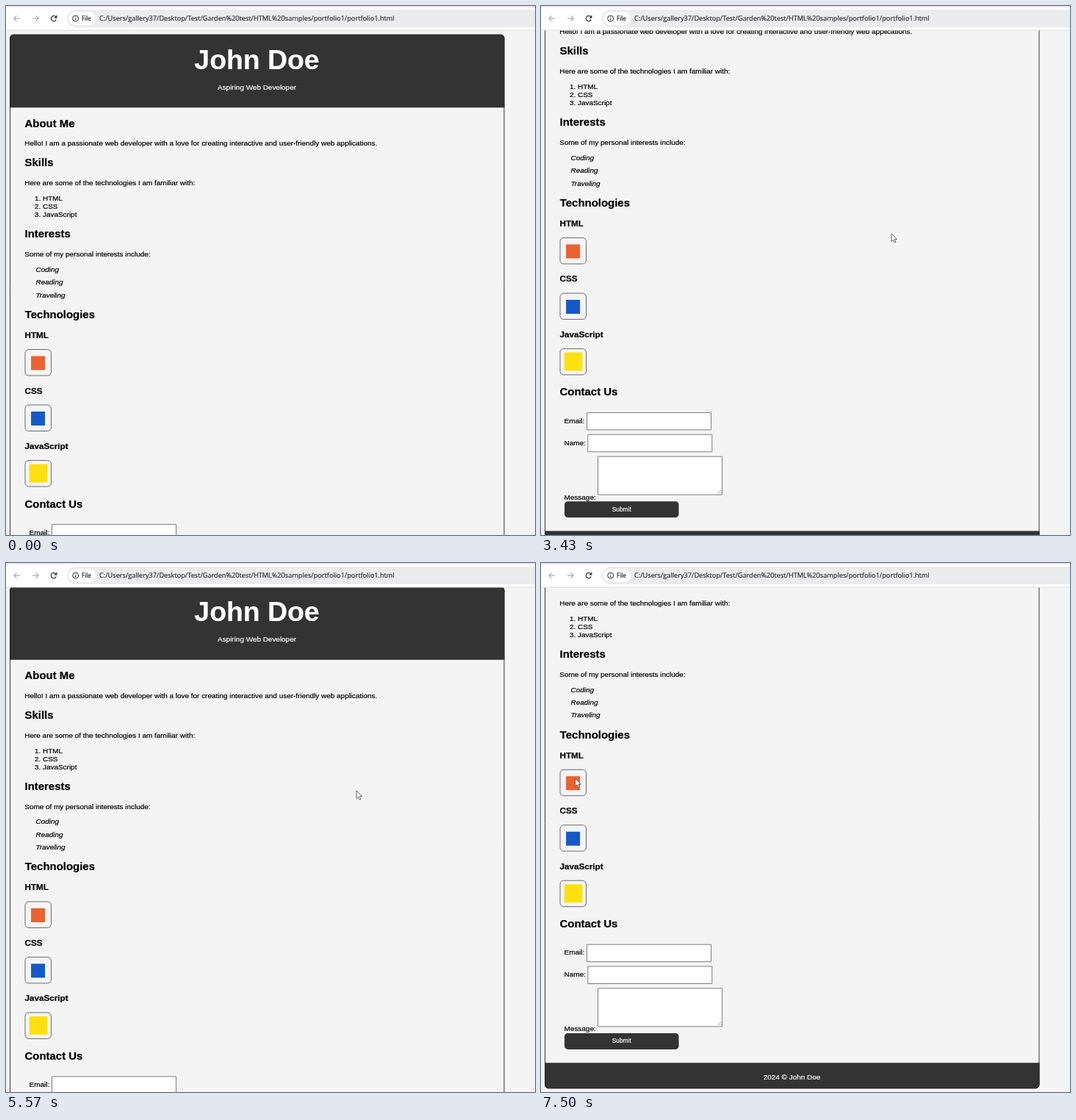
Write an HTML page with a canvas that moves like this. It is 720 by 720 pixels and loops after 7.53 s.

```html
<!DOCTYPE html>
<html lang="en">
<head>
<meta charset="utf-8">
<title>Portfolio page</title>
<style>
  html, body { margin: 0; width: 100%; height: 100%; overflow: hidden; background: #f4f4f4; }
  canvas { display: block; width: 720px; height: 720px; }
</style>
</head>
<body>
<canvas id="stage" width="720" height="720"></canvas>
<script>
const ctx = document.getElementById('stage').getContext('2d');
const LOOP = 7530;
const FPS = 30;
const BOTTOM = 186.3;
const MID = 341.5;
const DARK = '#333';
const SANS = '"Liberation Sans", Arial, sans-serif';
const UI = '"Open Sans", "Noto Sans", sans-serif';
const BODY = '9.95px ' + SANS;
const ITALIC = 'italic ' + BODY;
const H2 = 'bold 14.95px ' + SANS;
const H3 = 'bold 11.7px ' + SANS;

// Time, x and y of the pointer tip
const POINTER = [
  [320, 697, 207], [700, 398, 371], [1070, 461, 329], [1400, 476.5, 309.5],
  [6480, 476.5, 309.5], [6720, 451, 346], [7067, 451, 346], [7500, 46.2, 293]
];

// A hairline outline gives small type its screen weight
function text(str, x, y, font, color = '#000', align = 'left') {
  ctx.font = font;
  ctx.fillStyle = ctx.strokeStyle = color;
  ctx.textAlign = align;
  ctx.lineWidth = 0.2;
  ctx.fillText(str, x, y);
  ctx.strokeText(str, x, y);
}

function fillBox(x, y, w, h, color, radius = 0) {
  ctx.beginPath();
  ctx.roundRect(x, y, w, h, radius);
  ctx.fillStyle = color;
  ctx.fill();
}

function strokeBox(x, y, w, h, color, radius = 0, width = 1) {
  ctx.beginPath();
  ctx.roundRect(x, y, w, h, radius);
  ctx.strokeStyle = color;
  ctx.lineWidth = width;
  ctx.stroke();
}

function line(points, color, width = 1) {
  ctx.beginPath();
  points.forEach(([x, y]) => ctx.lineTo(x, y));
  ctx.strokeStyle = color;
  ctx.lineWidth = width;
  ctx.stroke();
}

// Wheel scrolling: quick start, long settle
function glide(t, start, tau, power) {
  return t <= start ? 0 : 1 - Math.exp(-Math.pow((t - start) / tau, power));
}

function scrollAt(t) {
  if (t < 5237) return BOTTOM * glide(t, 3167, 207, 2.09);
  if (t < 6240) return BOTTOM * (1 - glide(t, 5237, 166, 1.76));
  return BOTTOM * glide(t, 6240, 203, 1.76);
}

function pointerAt(t) {
  if (t < POINTER[0][0]) return null;
  const i = POINTER.findIndex(p => p[0] > t);
  if (i < 0) return POINTER[POINTER.length - 1].slice(1);
  const [t0, x0, y0] = POINTER[i - 1];
  const [t1, x1, y1] = POINTER[i];
  const u = (t - t0) / (t1 - t0);
  const e = u * u * (3 - 2 * u);
  return [x0 + (x1 - x0) * e, y0 + (y1 - y0) * e];
}

function drawTech(name, y, color, size, cx, cy) {
  text(name, 25.5, y, H3);
  strokeBox(26, y + 15.5, 35.5, 35.5, '#6a6a6a', 5);
  fillBox(cx - size / 2, y + cy - size / 2, size, size, color);
}

function drawForm() {
  const edge = '#7d7d7d';
  text('Email:', 31.6, 719.6, BODY);
  text('Name:', 31.6, 749.6, BODY);
  text('Message:', 31.6, 823.6, BODY);
  [[62.5, 705.5, 169, 23.5], [63.8, 735.3, 169, 23.5], [77.5, 765.2, 169, 52]].forEach(([x, y, w, h]) => {
    fillBox(x, y, w, h, '#fff');
    strokeBox(x, y, w, h, edge);
  });
  line([[240.5, 815.5], [245.3, 810.7]], edge, 0.7);
  line([[243.3, 815.5], [245.3, 813.5]], edge, 0.7);
  fillBox(32, 826.2, 155.5, 22, DARK, 4.5);
  text('Submit', 109.7, 839.6, '8.4px ' + SANS, '#fff', 'center');
}

function drawPage() {
  fillBox(5, 38.7, 673.5, 99.6, DARK, [5, 5, 0, 0]);
  text('John Doe', MID, 86, 'bold 37.4px ' + SANS, '#fff', 'center');
  text('Aspiring Web Developer', MID, 114, BODY, '#fff', 'center');

  text('About Me', 25.5, 164.5, H2);
  text('Hello! I am a passionate web developer with a love for creating interactive and user-friendly web applications.', 25.3, 190.2, BODY);

  text('Skills', 25.5, 218.4, H2);
  text('Here are some of the technologies I am familiar with:', 25.3, 244.1, BODY);
  ['HTML', 'CSS', 'JavaScript'].forEach((item, i) => {
    const y = 265.1 + i * 11.1;
    text(i + 1 + '.', 39, y, BODY);
    text(item, 50, y, BODY);
  });

  text('Interests', 25.5, 315.4, H2);
  text('Some of my personal interests include:', 25.3, 341.2, BODY);
  ['Coding', 'Reading', 'Traveling'].forEach((item, i) => text(item, 40.5, 361.9 + i * 17.4, ITALIC));

  text('Technologies', 25.8, 425, H2);
  drawTech('HTML', 452, '#ea6232', 19, 43.6, 34);
  drawTech('CSS', 527.5, '#1459c7', 19, 43.6, 34);
  drawTech('JavaScript', 603, '#fee010', 24.8, 44, 33);

  text('Contact Us', 25.5, 682.5, H2);
  drawForm();

  fillBox(5, 866.5, 673.5, 35, DARK, [0, 0, 5, 5]);
  text('2024 © John Doe', MID, 889.5, BODY, '#fff', 'center');
  strokeBox(5.5, 39.2, 672.5, 862, '#222', 5, 0.9);
}

function drawArrow(x, dir, color) {
  line([[x - 4 * dir, 17], [x + 4 * dir, 17]], color, 1.1);
  line([[x + 0.6 * dir, 13.4], [x + 4.2 * dir, 17], [x + 0.6 * dir, 20.6]], color, 1.1);
}

function drawToolbar() {
  fillBox(0, 0, 720, 33, '#fff');
  fillBox(0, 0, 720, 1.5, '#e9dcf3');
  fillBox(0, 32.6, 720, 1, '#dedede');

  drawArrow(15, -1, '#a3a3a3');
  drawArrow(40, 1, '#a3a3a3');

  ctx.beginPath();
  ctx.arc(65, 17, 3.6, -0.5, -Math.PI * 2 + 0.45, true);
  ctx.strokeStyle = '#222';
  ctx.lineWidth = 1.2;
  ctx.stroke();
  line([[68.8, 12.8], [68.8, 15.8], [65.8, 15.8]], '#222', 1.2);

  fillBox(83, 5, 660, 24, '#ececee', 12);
  fillBox(85, 8, 37, 18, '#fff', 9);
  ctx.beginPath();
  ctx.arc(94.7, 17, 4, 0, Math.PI * 2);
  ctx.strokeStyle = DARK;
  ctx.lineWidth = 1;
  ctx.stroke();
  fillBox(94.2, 16.4, 1, 3, DARK);
  fillBox(94.2, 14.5, 1, 1, DARK);
  text('File', 103, 20, '8.1px ' + UI, '#222');
  text('C:/Users/gallery37/Desktop/Test/Garden%20test/HTML%20samples/portfolio1/portfolio1.html', 127, 20.1, '9.19px ' + UI, '#2c2c2c');
}

function drawPointer(x, y) {
  ctx.save();
  ctx.translate(x, y);
  ctx.beginPath();
  [[0.5, 0.3], [0.5, 11], [2.9, 8.8], [4.6, 12.6], [6.4, 11.8], [4.8, 8.1], [8, 8]].forEach(p => ctx.lineTo(...p));
  ctx.closePath();
  ctx.fillStyle = '#fff';
  ctx.fill();
  ctx.strokeStyle = '#555';
  ctx.lineWidth = 0.9;
  ctx.stroke();
  ctx.restore();
}

function draw(t) {
  fillBox(0, 0, 720, 720, '#f4f4f4');
  ctx.save();
  ctx.translate(0, -scrollAt(t));
  drawPage();
  ctx.restore();
  drawToolbar();
  const tip = pointerAt(t);
  if (tip) drawPointer(...tip);
}

const start = performance.now();
function tick() {
  const t = (performance.now() - start) % LOOP;
  // Hold each picture for one video step
  draw(Math.floor((t + 4) * FPS / 1000) * 1000 / FPS);
  requestAnimationFrame(tick);
}
tick();
</script>
</body>
</html>
```
